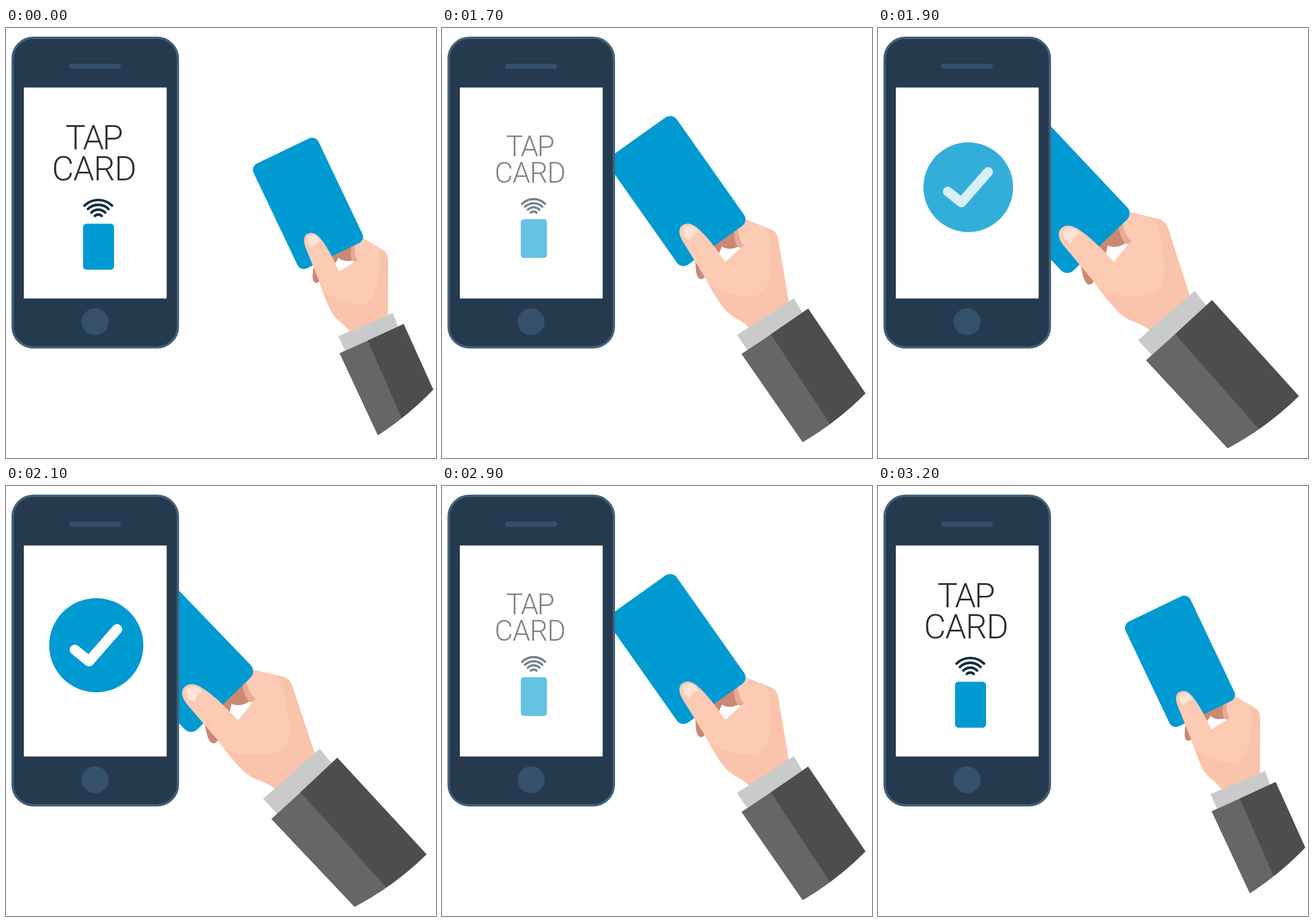
An HTML page that plays this animation: 748x748 px, repeating every 3300 ms.

```html
<!DOCTYPE html>
<html lang="en">
<head>
<meta charset="utf-8">
<title>Tap card</title>
<style>
  html, body { margin: 0; height: 100%; overflow: hidden; background: #fff; }
  svg { display: block; width: 100vw; height: 100vh; }
  text { font: 300 58.5px Roboto, Inter, sans-serif; text-anchor: middle; fill: #302e30; }
</style>
</head>
<body>
<svg viewBox="0 0 748 748">
  <clipPath id="reach"><circle cx="363" cy="267" r="525"/></clipPath>

  <g clip-path="url(#reach)">
    <g id="arm">
      <!-- fingers behind the card -->
      <path fill="#cb8873" d="M440 400L442 424Q444 437 451 437Q457 436 461 426L470 400Z
        M470 376L512 345L520 377Q511 384 500 384Q492 384 487 380L482 392Z"/>
      <path fill="#e8ab95" d="M508 352Q508 374 515 381Q520 385 527 377L522 345Z"/>
      <!-- hand -->
      <path fill="#fac4ac" d="M514 340L526 332L574 351Q584 356 586 374L604 480L537 525
        Q529 515 515 507Q499 499 488 485Q474 466 459 437L493 407L525 378Q515 368 514 340Z"/>
      <path fill="#fdcbb3" d="M514 340L526 333L553 344Q569 350 570 378L571 418Q570 448 557 460
        Q549 467 528 466Q493 465 465 447L459 437L493 407L525 378Q515 368 514 340Z"/>
      <path fill="#009ad2" stroke="#009ad2" stroke-width="28" stroke-linejoin="round"
        d="M397 167L514 333L420 400L303 234Z"/>
      <path fill="#fdcbb3" d="M466 449L457 433L418 370Q409 354 416 345Q427 335 442 346
        Q458 359 475 382L493 407L500 430Z"/>
      <path fill="#fee3d6" d="M419 354Q419 345 430 344Q440 345 445 355Q434 359 430 369Q420 364 419 354Z"/>
      <!-- cuff and sleeve -->
      <path fill="#c9cbca" d="M513 534L612 470L627 495L531 560Z"/>
      <path fill="#666" d="M521 567L573 532L776 843L733 873Z"/>
      <path fill="#4d4d4d" d="M572 532.5L637 488L837 784L776 843Z"/>
    </g>
  </g>

  <!-- phone -->
  <rect x="11.5" y="17" width="287.5" height="538.5" rx="36" fill="#25394f" stroke="#456079" stroke-width="4"/>
  <rect x="110" y="62" width="90" height="9" rx="4.5" fill="#35506a"/>
  <circle cx="155" cy="511" r="23.5" fill="#35506a"/>
  <path fill="#fff" d="M31 103.5H279.5V470.5H31Z"/>

  <g id="prompt">
    <text x="152.5" y="211" letter-spacing="-2.5">TAP</text>
    <text x="153" y="264.5" letter-spacing="-1">CARD</text>
    <path id="waves" fill="none" stroke="#0f2d40" stroke-width="4.4" stroke-linecap="round"/>
    <rect x="134" y="340.5" width="54" height="80" rx="6" fill="#009ad2"/>
  </g>

  <g id="done">
    <circle r="78" fill="#009ad2"/>
    <path fill="none" stroke="#fff" stroke-width="17" stroke-linecap="round" stroke-linejoin="round"
      d="M-35.5 7.5L-12 26.5L34.5 -26.5"/>
  </g>
</svg>
<script>
const LOOP = 3300, STEP = 100, LAST = 6;
const [arm, prompt, waves, done] =
  ["arm", "prompt", "waves", "done"].map(id => document.getElementById(id));

// four concentric quarter arcs
waves.setAttribute("d", [1, 2, 3, 4].map(i => {
  const h = 6 * i, r = 8.5 * i;
  return `M${160.5 - h} ${333 - h}a${r} ${r} 0 0 1 ${2 * h} 0`;
}).join(""));

// opacity and scale of both screens at each step
const promptFade = [1, 1, 0.8, 0.6, 0.2, 0, 0, 0];
const doneFade = [0, 0, 0, 0, 0.4, 0.8, 1, 1];
const doneScale = [0, 0, 0, 0, 0.85, 1, 1.077, 1.05];

const ease = u => u < 0.5 ? (2 * u) ** 2.35 / 2 : 1 - (2 - 2 * u) ** 2.35 / 2;

function stepAt(t) {
  if (t < 1500) return 0;
  if (t < 2700) return Math.min(LAST + 1, Math.floor((t - 1500) / STEP) + 1);
  return Math.max(0, 5 - Math.floor((t - 2700) / STEP));
}

function draw(n) {
  const p = ease(Math.min(1, n / LAST));
  const x = 518 - 196 * p;
  const y = 407 - 33.15 * p + 38.3 * p * p;
  const turn = 9.75 - 20.54 * p + 2.08 * p * p;
  const size = 0.8735 + 0.2636 * p - 0.0212 * p * p;
  arm.setAttribute("transform",
    `translate(${x} ${y}) rotate(${turn}) scale(${size}) translate(-420 -400)`);

  const fade = promptFade[n];
  prompt.setAttribute("opacity", fade);
  prompt.setAttribute("transform",
    `translate(153.5 290) scale(${0.605 + 0.395 * fade}) translate(-153.5 -290)`);

  done.setAttribute("transform", `translate(157 277) scale(${doneScale[n]})`);
  for (const part of done.children) part.setAttribute("opacity", doneFade[n]);
}

const start = performance.now();
function tick() {
  draw(stepAt((performance.now() - start) % LOOP));
  requestAnimationFrame(tick);
}
tick();
</script>
</body>
</html>
```
